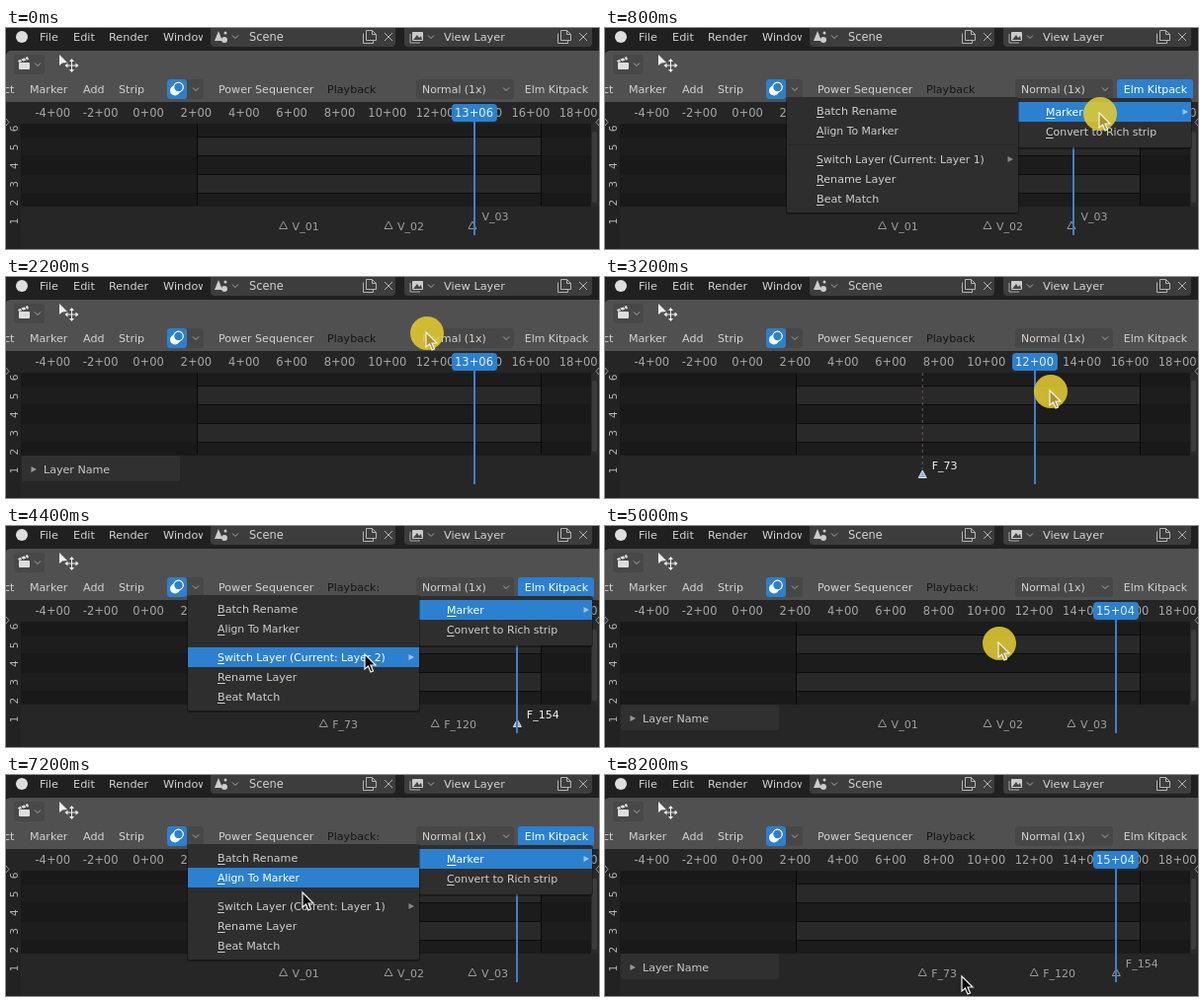
Animation of 600 by 224 pixels, one loop 8.4 s. Source, as an HTML page with a canvas:

```html
<!DOCTYPE html>
<html lang="en">
<head>
<meta charset="utf-8">
<title>Marker layers</title>
<style>
html, body { margin: 0; width: 100%; height: 100%; overflow: hidden; background: #1d1d1d; }
canvas { display: block; width: 600px; height: 224px; }
</style>
</head>
<body>
<canvas id="stage" width="600" height="224"></canvas>
<script>
const ctx = document.getElementById('stage').getContext('2d');
const STEP = 200, STEPS = 42;
const BLUE = '#2b80d0', MENU = '#2e2e2e', FIELD = '#3d3d3d', PALE = '#d2d2d2';

// Pointer path: step, x, y
const path = [
  [1, 540, 150], [2, 555, 68], [3, 552, 66], [4, 500, 86], [5, 400, 90],
  [6, 330, 131], [7, 378, 131], [8, 430, 70], [9, 470, 14], [10, 425, 53],
  [11, 425, 56], [12, 398, 105], [13, 321, 108], [14, 325, 116], [15, 435, 112],
  [16, 450, 115], [17, 470, 130], [18, 517, 108], [19, 530, 95], [20, 552, 66],
  [21, 440, 86], [22, 363, 130], [23, 400, 131], [24, 400, 112], [25, 398, 118],
  [30, 323, 198], [33, 552, 66], [34, 500, 86], [35, 400, 90], [36, 300, 119],
  [37, 330, 131], [38, 380, 131], [39, 390, 152], [40, 372, 188], [41, 361, 204]
];
const clicks = [3, 10, 15, 20, 24, 30, 33, 39];
const layers = {
  V: [['V_01', 56.5], ['V_02', 100.5], ['V_03', 135.6]],
  F: [['F_73', 73.3, 14], ['F_120', 120, 17], ['F_154', 154.4, 19]]
};
const items = [['Batch Rename', 84], ['Align To Marker', 104], ['Switch Layer (Current: Layer ', 133],
  ['Rename Layer', 153], ['Beat Match', 173]];

const within = (n, a, b) => n >= a && n <= b;
const frameX = f => 144 + f * 2.418;

function box(x, y, w, h, color, r = 0) {
  ctx.fillStyle = color;
  ctx.beginPath();
  ctx.roundRect(x, y, w, h, r);
  ctx.fill();
}

function text(s, x, y, color = PALE, size = 11.1, align = 'left') {
  ctx.font = size + 'px "DejaVu Sans", sans-serif';
  ctx.textAlign = align;
  ctx.fillStyle = color;
  ctx.fillText(s, x, y + 4);
}

function poly(points, color, fill, width = 1) {
  ctx.beginPath();
  points.forEach(([x, y]) => ctx.lineTo(x, y));
  if (fill) {
    ctx.closePath();
    ctx.fillStyle = fill;
    ctx.fill();
  }
  if (color) {
    ctx.strokeStyle = color;
    ctx.lineWidth = width;
    ctx.stroke();
  }
}

function disc(x, y, r, fill, stroke) {
  ctx.beginPath();
  ctx.arc(x, y, r, 0, Math.PI * 2);
  if (fill) { ctx.fillStyle = fill; ctx.fill(); }
  if (stroke) { ctx.strokeStyle = stroke; ctx.lineWidth = 1.2; ctx.stroke(); }
}

const chevron = (x, y) => poly([[x - 3, y - 1.5], [x, y + 1.5], [x + 3, y - 1.5]], '#aaa');
const arrow = (x, y, color) => poly([[x - 2.5, y - 3], [x + 3, y], [x - 2.5, y + 3]], null, color);

function copyIcon(x, y) {
  poly([[x - 3.5, y - 6.5], [x + 2.5, y - 6.5], [x + 6.5, y - 2.5], [x + 6.5, y + 3.5],
    [x - 3.5, y + 3.5], [x - 3.5, y - 6.5]], '#b4b4b4');
  poly([[x + 2.5, y - 6.5], [x + 2.5, y - 2.5], [x + 6.5, y - 2.5]], '#b4b4b4');
  poly([[x - 6.5, y - 3.5], [x - 6.5, y + 6.5], [x + 3.5, y + 6.5], [x + 3.5, y + 3.5]], '#b4b4b4');
}

function cross(x, y) {
  poly([[x - 4, y - 4], [x + 4, y + 4]], '#b4b4b4');
  poly([[x + 4, y - 4], [x - 4, y + 4]], '#b4b4b4');
}

function topBar() {
  box(0, 0, 600, 24, '#202020');
  box(207, -4, 187, 23, FIELD, 4);
  box(403, -4, 190, 23, FIELD, 4);
  disc(16, 9, 6, '#dedede');
  text('File', 34, 9, PALE, 11.3);
  text('Edit', 68, 9, PALE, 11.3);
  text('Render', 104, 9, PALE, 11.3);
  ctx.save();
  ctx.beginPath();
  ctx.rect(150, 0, 49, 22);
  ctx.clip();
  text('Window', 159, 9, PALE, 11.3);
  ctx.restore();
  poly([[215, 3], [219, 13], [211, 13]], null, '#ccc');
  disc(221, 12, 3, '#ccc');
  disc(222, 5, 1.5, '#ccc');
  chevron(232, 9);
  text('Scene', 246, 9, PALE, 11.4);
  copyIcon(368, 9);
  cross(387, 9);
  box(411, 4, 11, 9, '#ccc', 1);
  poly([[412, 12], [416, 7], [418, 10], [420, 8], [421, 12]], null, '#444');
  poly([[409, 6], [409, 15], [419, 15]], '#aaa');
  chevron(430, 9);
  text('View Layer', 443, 9, PALE, 11.3);
  copyIcon(565, 9);
  cross(584, 9);
}

function header(n, open) {
  box(0, 23, 604, 52, '#505050', [5, 0, 0, 0]);
  box(8, 27, 31, 20, '#484848', 3);
  box(13, 35, 11, 7, '#ddd', 1);
  poly([[12, 33], [22, 29], [23, 32], [13, 35]], null, '#ddd');
  poly([[15, 32], [17, 34]], '#484848');
  poly([[19, 30], [21, 33]], '#484848');
  chevron(32, 37);
  poly([[54, 27], [54, 38], [57, 35.5], [62, 35]], null, '#eee');
  poly([[61, 38], [72, 38]], '#eee');
  poly([[66.5, 33], [66.5, 44]], '#eee');
  for (const [dx, dy] of [[1, 0], [-1, 0], [0, 1], [0, -1]]) {
    const x = 66.5 + dx * 4, y = 38 + dy * 4;
    poly([[x + dx * 3, y + dy * 3], [x + dy * 2.5, y + dx * 2.5], [x - dy * 2.5, y - dx * 2.5]], null, '#eee');
  }
  text('ct', -2, 62);
  text('Marker', 24, 62);
  text('Add', 78, 62);
  text('Strip', 114, 62);
  box(163, 52, 37, 20, '#474747', 3);
  box(163, 52, 20, 20, BLUE, 3);
  disc(171, 63.5, 5, '#fff');
  disc(174.5, 60, 4.8, BLUE, '#fff');
  chevron(192, 62);
  text('Power Sequencer', 215, 62);
  text(within(n, 20, 36) ? 'Playback:' : 'Playback', 325, 62, '#141414');
  box(415, 52, 99, 20, '#474747', 3);
  text('Normal (1x)', 421, 62, PALE, 10.9);
  chevron(506, 62);
  if (open) box(518, 52, 77, 20, BLUE, 3);
  text('Elm Kitpack', 557, 62, open ? '#fff' : PALE, 10.9, 'center');
}

function timeline() {
  box(0, 75, 600, 149, '#191919');
  box(0, 75, 600, 22, '#252525');
  box(193, 97, 349, 84, '#1c1c1c');
  for (const y of [111, 149]) {
    box(16, y, 577, 18, '#1d1d1d');
    box(193, y, 349, 18, '#292929');
  }
  for (const y of [110.5, 129.5, 148.5, 167.5]) poly([[193, y], [542, y]], '#0c0c0c');
  poly([[193.5, 97], [193.5, 180]], '#080808');
  poly([[541.5, 97], [541.5, 180]], '#080808');
  box(0, 181, 600, 43, '#262626');
  box(0, 97, 15, 127, '#222');
  box(592, 97, 8, 84, '#2a2a2a');
  box(593, 105, 5, 72, '#3c3c3c', 2);
  for (let s = -4; s <= 18; s += 2) text(s + '+00', frameX(s * 10), 86, '#a6a6a6', 11.5, 'center');
  poly([[0, 92], [3, 95.5], [0, 99]], '#999');
  poly([[600, 92], [597, 95.5], [600, 99]], '#999');
  for (let c = 1; c <= 6; c++) {
    ctx.save();
    ctx.translate(8, 196 - (c - 1) * 18.8);
    ctx.rotate(-Math.PI / 2);
    text(c, 0, 0, '#b5b5b5', 10.5, 'center');
    ctx.restore();
  }
}

function playFrame(n) {
  if (n < 12) return 136;
  if (n === 12) return 105;
  if (n < 15) return 73;
  return n < 18 ? 120 : 154;
}

function markers(n, now) {
  const onF = within(n, 11, 24) || n >= 40;
  const shown = layers[onF ? 'F' : 'V'].filter(m => !m[2] || n >= m[2]);
  const newest = onF && n < 25 ? shown.length - 1 : -1;
  shown.forEach(([name, f], i) => {
    const x = frameX(f), picked = i === newest;
    const up = picked || Math.abs(f - now) < 1;
    if (picked && n < 17) {
      ctx.setLineDash([3, 3]);
      poly([[x, 97], [x, 195]], '#705058');
      ctx.setLineDash([]);
    }
    poly([[x, 196], [x + 4, 203.5], [x - 4, 203.5], [x, 196]], picked ? '#ddd' : '#999', picked ? '#8fb4d8' : '#262626');
    text(name, x + (up ? 9.5 : 9), up ? 191 : 201, picked ? '#f0f0f0' : '#a0a0a0', 11);
  });
}

function playhead(f) {
  const x = Math.round(frameX(f));
  box(x, 94, 2, 116, '#4080c8');
  box(x - 22, 77, 46, 18, BLUE, 4);
  text(Math.floor(f / 10) + '+' + String(f % 10).padStart(2, '0'), x + 0.5, 86, '#e4eef8', 11.5, 'center');
}

function panel() {
  box(16, 181, 160, 26, '#303030', 2);
  arrow(28, 195, '#999');
  text('Layer Name', 38, 195, '#c8c8c8');
}

function menuBox(x, y, w, h) {
  box(x - 1, y, w + 2, h + 2, 'rgba(0,0,0,.35)', 3);
  box(x, y, w, h, MENU, 2);
}

function row(s, x, y, left, width, on, size) {
  if (on) box(left, y - 10, width, 20, BLUE);
  text(s, x, y, on ? '#fff' : '#cfcfcf', size);
}

// Marks the first letter as the shortcut
function underline(s, x, y, on) {
  box(x, y + 6, ctx.measureText(s[0]).width, 1, on ? '#fff' : '#cfcfcf');
}

function keyRow(s, x, y, left, width, on, size) {
  row(s, x, y, left, width, on, size);
  underline(s, x, y, on);
}

function layerList(n, p) {
  const last = n < 20 ? 8 : n < 30 ? 2 : 1;
  const scroll = n === 9 ? 20 : n === 10 ? 40 : 0;
  const rowY = k => 133 + 20 * (k - last) + scroll;
  const first = rowY(1), end = rowY(8);
  const top = first < 25 ? 7 : first - 13, bottom = end > 203 ? 222 : end + 11;
  menuBox(360, top, 233, bottom - top);
  for (let k = 1; k <= 8; k++) {
    const y = rowY(k);
    if (y > 24 && y < 205) row('Layer ' + k, 390, y, 360, 233, Math.abs(p[1] + 1 - y) < 10, 11);
  }
  if (first < 25) poly([[477, 11], [480, 16], [474, 16]], null, '#999');
  if (end > 203) poly([[477, 217], [480, 212], [474, 212]], null, '#999');
}

function menus(n, p, start) {
  menuBox(418, 71, 175, 50);
  const sub = n > start, list = within(n, 7, 10) || within(n, 23, 24) || within(n, 38, 39);
  keyRow('Marker', 446, 85, 418, 175, sub, 10.9);
  arrow(587, 85, sub ? '#9cc4ea' : '#999');
  keyRow('Convert to Rich strip', 446, 105, 418, 175, false, 10.9);
  if (!sub) return;
  menuBox(184, 70, 234, 117);
  box(186, 118, 230, 1, '#272727');
  const hover = list ? 2 : p[0] > 418 ? -1 : p[1] < 94 ? 0 : p[1] < 123 ? 1 : 2;
  items.forEach(([s, y], i) => {
    const label = i === 2 ? s + (within(n, 11, 24) ? 2 : 1) + ')' : s;
    keyRow(label, 214, y, 184, 234, i === hover, i === 1 || i === 2 ? 10.85 : 11.15);
  });
  arrow(410, 133, hover === 2 ? '#9cc4ea' : '#888');
  if (list) layerList(n, p);
}

function pointAt(n) {
  const i = path.findIndex(k => k[0] >= n);
  const b = path[i], a = path[Math.max(0, i - 1)];
  const u = b[0] === a[0] ? 1 : (n - a[0]) / (b[0] - a[0]);
  return [a[1] + (b[1] - a[1]) * u, a[2] + (b[2] - a[2]) * u];
}

function pointer(n, [x, y]) {
  if (clicks.includes(n)) return disc(x, y, 30, '#ffe931');
  const tint = clicks.includes(n - 1);
  if (tint) disc(x + 1, y + 1, 17, 'rgba(225,203,48,.88)');
  const shape = [[0, 0], [0, 15], [3.5, 12], [6, 18], [8.5, 17], [6, 11], [11, 11], [0, 0]];
  poly(shape.map(([a, b]) => [x + a, y + b]), '#f2f2f2', tint ? '#a8942a' : '#050505', 1.2);
}

function draw(n) {
  const p = pointAt(n), now = playFrame(n);
  const span = [[3, 10], [20, 24], [33, 39]].find(([a, b]) => within(n, a, b));
  timeline();
  topBar();
  header(n, span);
  markers(n, now);
  playhead(now);
  if (within(n, 11, 13) || within(n, 25, 31) || n >= 40) panel();
  if (span) menus(n, p, span[0]);
  if (n > 0) pointer(n, p);
}

const begin = performance.now();
let shown = -1;
function tick() {
  const n = Math.floor(Math.max(0, performance.now() - begin) / STEP) % STEPS;
  if (n !== shown) draw(shown = n);
  requestAnimationFrame(tick);
}
tick();
</script>
</body>
</html>
```
